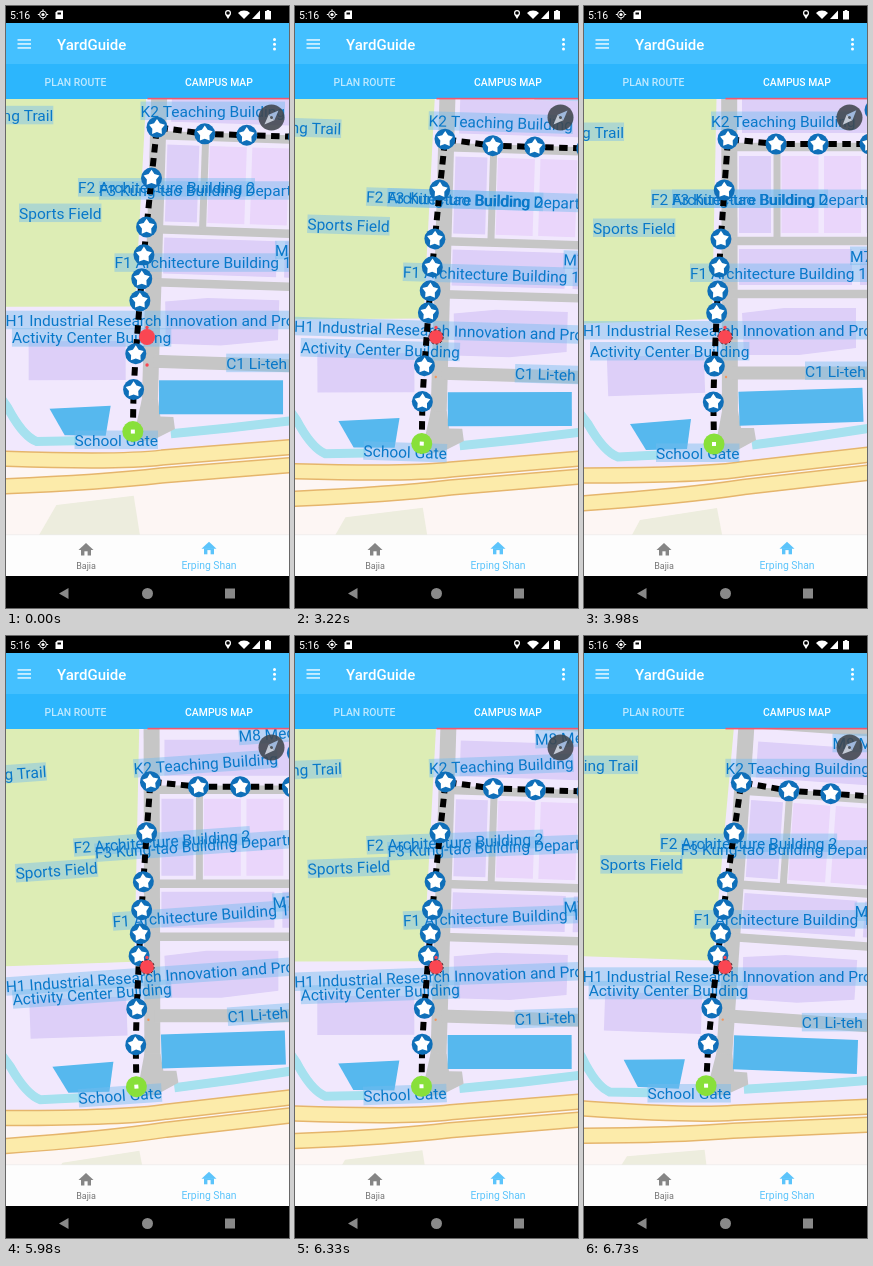
Recreate the animation shown at these times as an HTML page with a canvas. Size 283 by 602 pixels, loop 8000 ms.

```html
<!DOCTYPE html>
<html lang="en">
<head>
<meta charset="utf-8">
<title>Campus map</title>
<style>
  html, body { margin: 0; width: 100%; height: 100%; overflow: hidden; background: #000; }
  canvas { display: block; width: 283px; height: 602px; }
</style>
</head>
<body>
<canvas id="stage"></canvas>
<script>
const W = 283, H = 602, LOOP = 8000, RAD = Math.PI / 180;
const PIVOT = [141, 331];
const FONT = 'Roboto, "Open Sans", sans-serif';
const canvas = document.getElementById('stage');
const ctx = canvas.getContext('2d');
const dpr = window.devicePixelRatio || 1;
canvas.width = W * dpr;
canvas.height = H * dpr;

// Label: text, left edge, middle line (map at heading 0)
const labels = [
  ['Walking Trail', -48, 126],
  ['M8 Mechanics Building', 232, 82],
  ['K2 Teaching Building', 127, 115],
  ['F2 Architecture Building 2', 67, 193],
  ['F3 Kung-tao Building Department of Economics', 88, 193],
  ['Sports Field', 9, 222],
  ['M7 Dormitory Hall', 266, 250],
  ['F1 Architecture Building 1', 106, 267],
  ['H1 Industrial Research Innovation and Promotion Center', -1, 324.5],
  ['Activity Center Building', 6, 345.5],
  ['C1 Li-teh Hall', 221, 365],
  ['School Gate', 72, 447]
];

// The walk bends gently east on its way up, then turns right
const walkX = y => 129.3 + 0.0059 * Math.max(0, 400 - y) ** 1.4;
const gate = [130, 438];
const stops = [
  ...[396, 360, 307, 285, 261, 233, 184, 133].map(y => [walkX(y), y]),
  ...[192, 234, 286].map(x => [x, 138]),
  [291, 104]
];

function poly(color, ...pts) {
  ctx.beginPath();
  pts.forEach(p => ctx.lineTo(...p));
  ctx.fillStyle = color;
  ctx.fill();
}
function rect(color, x, y, w, h) {
  ctx.fillStyle = color;
  ctx.fillRect(x, y, w, h);
}
function disc(color, x, y, r) {
  ctx.beginPath();
  ctx.arc(x, y, r, 0, 7);
  ctx.fillStyle = color;
  ctx.fill();
}
function ring(color, x, y, r, width) {
  ctx.beginPath();
  ctx.arc(x, y, r, 0, 7);
  ctx.strokeStyle = color;
  ctx.lineWidth = width;
  ctx.stroke();
}
function curve(color, width, d) {
  ctx.strokeStyle = color;
  ctx.lineWidth = width;
  ctx.stroke(new Path2D(d));
}
function text(str, x, y, size, color, align = 'left', weight = 400) {
  ctx.font = `${weight} ${size}px ${FONT}`;
  ctx.textAlign = align;
  ctx.fillStyle = color;
  ctx.fillText(str, x, y);
}
function at(x, y, angle, draw) {
  ctx.save();
  ctx.translate(x, y);
  ctx.rotate(angle * RAD);
  draw();
  ctx.restore();
}
function block(color, cx, cy, w, h, angle) {
  at(cx, cy, angle, () => rect(color, -w / 2, -h / 2, w, h));
}

// Map heading, heading the labels were laid out for, and walked distance
function pose(t) {
  const ramp = (from, span) => Math.min(1, (t - from) / span);
  if (t < 3220) return { turn: 1.9, layout: 1.9, dx: 0, dy: -12 };
  if (t < 5980) return { turn: 1.9 * (1 - ramp(3150, 830)), layout: 0, dx: 0, dy: 0 };
  return { turn: 4 * ramp(5980, 750), layout: 4, dx: 0.4, dy: 12.7 };
}

function drawGround() {
  rect('#f1e8fd', -100, 0, 500, 700);
  poly('#fdf6f4', [-100, 470], [100, 468], [400, 440], [400, 700], [-100, 700]);
  poly('#ededde', [56, 514], [133, 502], [146, 570], [26, 570]);
  poly('#ddedb5', [-100, 20], [134, 20], [128, 313], [-100, 321]);

  const gray = '#c6c6c6', water = '#56b8ee', lilac = '#ddcff8', pink = '#ead6fb';
  curve('#a6e1ef', 9, 'M-20 386 L4 418 Q20 446 34 451 L74 449');
  curve('#a6e1ef', 9, 'M168 439 L228 431 L320 417');
  poly(water, [46, 418], [107, 413], [103, 443], [62, 444]);
  block(lilac, 72, 369, 97, 39, -2);

  curve(gray, 16, 'M145 20 L146 425');
  poly(gray, [138, 405], [154, 405], [157, 422], [170, 422], [172, 434], [150, 446], [130, 448]);
  for (const y of [74, 141, 235, 288, 367]) curve(gray, y === 367 ? 13 : 8.5, `M148 ${y} H400`);
  curve(gray, 7, 'M193 143 V233');

  rect(lilac, 158, 91, 150, 36);
  for (let i = 0; i < 4; i++) rect(i % 3 ? pink : lilac, 155 + 42.5 * i, 150, i ? 37 : 32, 77);
  for (let i = 0; i < 2; i++) rect(lilac, 155 + 121 * i, 243, 113, 36);
  poly(lilac, [158, 307], [200, 302], [272, 302], [272, 342], [215, 349], [160, 349]);
  block(water, 217, 400.8, 124, 34, -1.9);

  const bands = ['M-60 469 Q110 471 160 463 L360 440', 'M-60 501 Q80 493 160 481 L360 458'];
  for (const d of bands) curve('#e5b56c', 16.5, d);
  for (const d of bands) curve('#fcebaa', 13.5, d);
}

function drawLabels(angle) {
  ctx.font = `15.5px ${FONT}`;
  ctx.textAlign = 'center';
  const each = draw => labels.forEach(([str, left, y]) => {
    const w = ctx.measureText(str).width;
    at(left + w / 2, y, angle, () => draw(str, w));
  });
  each((str, w) => rect('rgba(115,187,238,.45)', -w / 2, -9.5, w, 18.5));
  ctx.fillStyle = '#0878c9';
  each(str => ctx.fillText(str, 0, 5.5));
}

function star() {
  disc('#0f6fb9', 0, 0, 10.5);
  const pts = Array.from({ length: 10 }, (_, i) => {
    const r = i % 2 ? 4.9 : 8.3, a = i * 36 * RAD;
    return [r * Math.sin(a), -r * Math.cos(a)];
  });
  poly('#fff', ...pts);
}

function drawRoute(angle) {
  ctx.setLineDash([8.5, 5.5]);
  curve('#000', 6, 'M' + [gate, ...stops].join('L'));
  ctx.setLineDash([]);
  for (const [x, y] of stops) at(x, y, angle, star);
  at(...gate, angle, () => {
    disc('#88e03a', 0, 0, 10.5);
    rect('#fff', -2, -2, 4, 4);
  });
}

function drawMap(t) {
  const { turn, layout, dx, dy } = pose(t), early = t < 3220, red = '#fa4652';
  ctx.save();
  ctx.beginPath();
  ctx.rect(0, 93, W, 436);
  ctx.clip();
  at(...PIVOT, turn, () => {
    ctx.translate(dx - PIVOT[0], dy - PIVOT[1]);
    drawGround();
    drawLabels(-layout);
    drawRoute(-layout);
    disc(early ? red : '#f2955e', 142, 371, early ? 1.7 : 1.2);
  });
  disc(red, 141, 321.5, 1.7);
  disc(red, ...PIVOT, early ? 8 : 7);
  if (!early) {
    ctx.setLineDash([2.5, 2]);
    ring('#54242a', ...PIVOT, 7.2, 1);
    ctx.setLineDash([]);
  }
  disc('rgba(64,70,76,.88)', 265.5, 111.5, 13);
  at(265.5, 111.5, 43 + turn, () => {
    poly('#9fb8dc', [0, -10], [4, 0], [-4, 0]);
    poly('#c3cad6', [0, 10], [4, 0], [-4, 0]);
    disc('#50575e', 0, 0, 1.5);
  });
  ctx.restore();
}

function house(x, y, color) {
  poly(color, [x, y - 6.5], [x + 7.5, y + 0.5], [x - 7.5, y + 0.5]);
  for (const side of [-5, 1.6]) rect(color, x + side, y, 3.4, 6);
  rect(color, x - 2, y, 4, 1.8);
}

function drawStatus() {
  const white = '#fff';
  rect('#000', 0, 0, W, 17);
  text('5:16', 4, 12.5, 10.5, white);
  ring(white, 37, 8.5, 3.4, 1);
  disc(white, 37, 8.5, 1.6);
  for (let i = 0; i < 4; i++) at(37, 8.5, i * 90, () => rect(white, 3.3, -0.5, 1.9, 1));
  poly(white, [49.5, 6.5], [51.5, 4.5], [57, 4.5], [57, 13], [49.5, 13]);
  rect('#000', 51.5, 6.5, 3.5, 2);
  poly(white, [219.3, 8.5], [224.7, 8.5], [222, 13]);
  disc(white, 222, 7, 3);
  disc('#000', 222, 7, 1.8);
  ctx.beginPath();
  ctx.moveTo(238, 13);
  ctx.arc(238, 13, 8.5, -135 * RAD, -45 * RAD);
  ctx.fillStyle = white;
  ctx.fill();
  poly(white, [246, 13], [254, 13], [254, 4.5]);
  rect(white, 259, 5, 6, 8.5);
  rect(white, 260.7, 4, 2.6, 1.5);
}

function drawBars() {
  drawStatus();
  rect('#44c0ff', 0, 17, W, 41);
  for (let i = 0; i < 3; i++) {
    rect('#fff', 11.5, 33.3 + 4 * i, 13.5, 1.3);
    disc('#fff', 268.5, 33.5 + 4.8 * i, 1.5);
  }
  text('YardGuide', 51, 43.5, 15, '#fff', 'left', 500);

  rect('#2cb6fd', 0, 58, W, 35);
  text('PLAN ROUTE', 69.5, 80, 10.4, 'rgba(255,255,255,.7)', 'center', 500);
  text('CAMPUS MAP', 213, 80, 10.4, '#fff', 'center', 500);
  rect('#f2586c', 141.5, 91.8, 141.5, 1.6);

  rect('#fdfdfd', 0, 529, W, 41);
  rect('#ebebeb', 0, 528.5, W, 0.7);
  house(80, 543.5, '#858585');
  text('Bajia', 80, 562.5, 9, '#757575', 'center');
  house(203, 542.3, '#5cc4fb');
  text('Erping Shan', 203, 562.5, 10.4, '#5cc4fb', 'center');

  const key = '#898989';
  rect('#000', 0, 570, W, 32);
  poly(key, [53, 587.5], [62.5, 582], [62.5, 593]);
  disc(key, 141.5, 587.5, 5.5);
  rect(key, 219, 582.5, 10, 10);
}

const start = performance.now();
function frame(now) {
  const t = Math.max(0, now - start) % LOOP;
  ctx.setTransform(dpr, 0, 0, dpr, 0, 0);
  drawMap(t);
  drawBars();
  requestAnimationFrame(frame);
}
frame(start);
</script>
</body>
</html>
```
